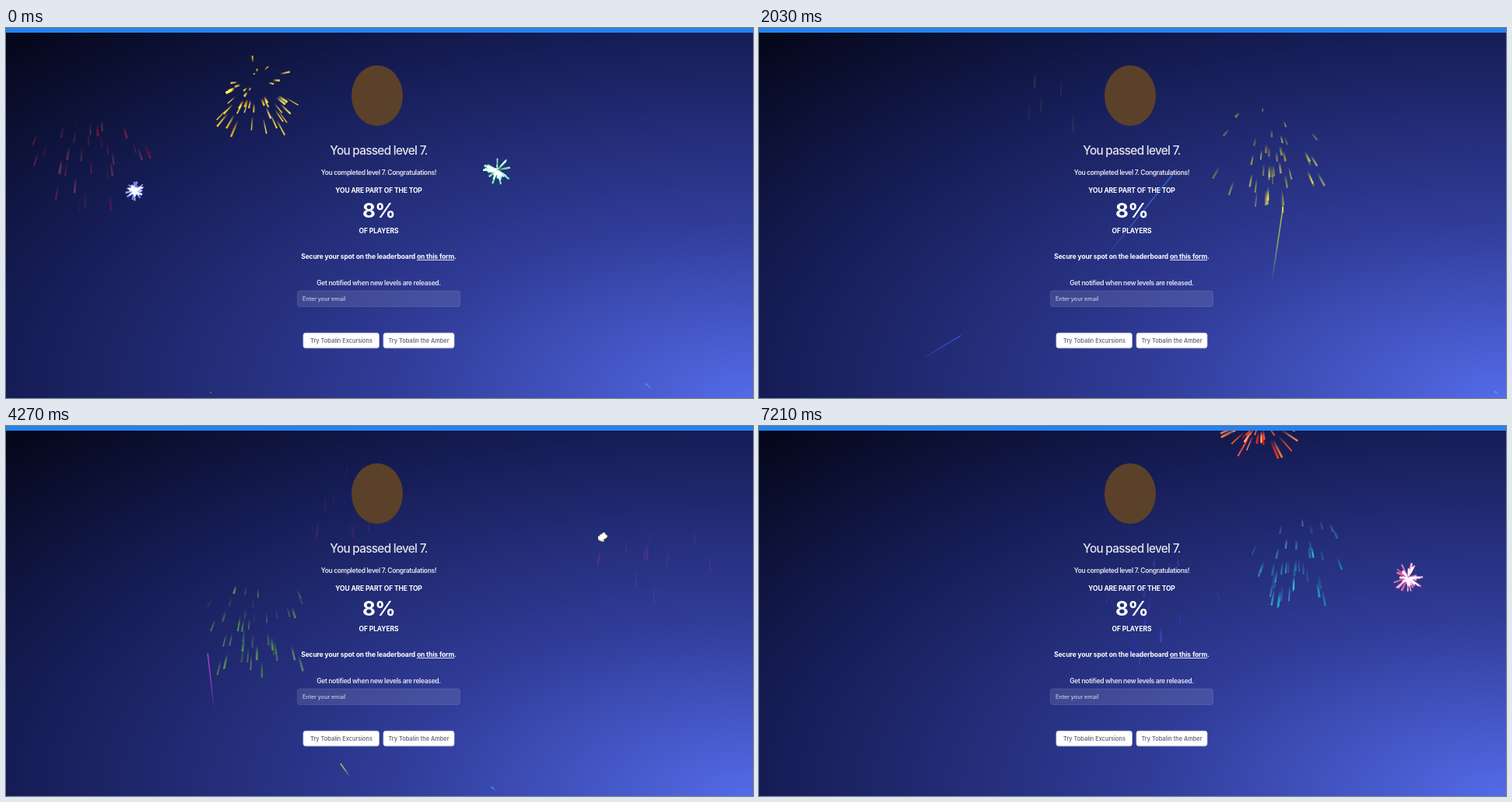
Animation of 960 by 476 pixels, one loop 7.28 s. Source, as an HTML page with a canvas:

```html
<!DOCTYPE html>
<html lang="en">
<head>
<meta charset="utf-8">
<title>Level passed</title>
<style>
  html, body { margin: 0; width: 100%; height: 100%; overflow: hidden; }
  body { background: radial-gradient(ellipse farthest-corner at 100% 100%,
    #546be8 0, #303c98 34%, #161d56 70%, #030616 100%); }
  canvas, svg { position: absolute; left: 0; top: 0; width: 960px; height: 476px; }
  text { font: 600 8.5px Inter, sans-serif; letter-spacing: -.04em; fill: #e4e4ec; text-anchor: middle; }
  .title { font-size: 15.3px; font-weight: 500; letter-spacing: -.045em; }
  .bold { font-weight: 700; letter-spacing: -.015em; fill: #fff; }
  .big { font-size: 26px; letter-spacing: -.03em; }
  .hint { font-size: 7.3px; font-weight: 500; letter-spacing: -.01em; text-anchor: start; fill: #c3c7e0; }
  .label { font-size: 7.4px; font-weight: 500; letter-spacing: 0; fill: #565b70; }
  .button { fill: #fff; stroke: #c0c3dc; stroke-width: .8; }
  .field { fill: #fff; fill-opacity: .11; stroke: #fff; stroke-opacity: .1; }
  .link { text-decoration: underline; }
</style>
</head>
<body>
<canvas width="960" height="476"></canvas>
<svg viewBox="0 0 960 476">
  <rect width="960" height="6" fill="#2583f0"/>
  <ellipse cx="477" cy="87" rx="33" ry="39" fill="#5b4129"/>
  <text class="title" x="479" y="163">You passed level 7.</text>
  <text x="479" y="189">You completed level 7. Congratulations!</text>
  <text class="bold" x="479" y="212">YOU ARE PART OF THE TOP</text>
  <text class="bold big" x="479" y="244">8%</text>
  <text class="bold" x="479" y="263.5">OF PLAYERS</text>
  <text class="bold" x="479" y="297">Secure your spot on the leaderboard <tspan class="link">on this form</tspan>.</text>
  <text x="479" y="330.5">Get notified when new levels are released.</text>
  <rect class="field" x="374.5" y="338" width="209" height="20.5" rx="3"/>
  <text class="hint" x="381" y="351">Enter your email</text>
  <rect class="button" x="382" y="392.3" width="97.5" height="19.5" rx="3"/>
  <text class="label" x="431" y="405">Try Tobalin Excursions</text>
  <rect class="button" x="485" y="392.3" width="91" height="19.5" rx="3"/>
  <text class="label" x="530.5" y="405">Try Tobalin the Amber</text>
</svg>
<script>
const LOOP = 7280, STEP = 70, FLOOR = 476;
const LAUNCH = 60, BOOST = 2.9, DRAG = 3.08, GRAVITY = 60, TRAIL = .2;
const ctx = document.querySelector('canvas').getContext('2d');

function seeded(seed) {
  return () => {
    seed = seed + 0x6d2b79f5 | 0;
    let n = Math.imul(seed ^ seed >>> 15, 1 | seed);
    n = n + Math.imul(n ^ n >>> 7, 61 | n) ^ n;
    return ((n ^ n >>> 14) >>> 0) / 4294967296;
  };
}

// Main bursts: time in seconds, x, y, hue
const shells = [
  [-.45, 320, 84, 48], [-.06, 165, 209, 235], [.65, 85, 125, 14], [1, 385, 38, 66],
  [2.13, 624, 75, 222], [2.48, 756, 96, 230], [3.3, 457, 70, 342], [3.34, 840, 103, 305],
  [4.45, 240, 126, 298], [4.82, 177, 78, 62], [5.18, 96, 60, 8], [5.47, 388, 130, 58],
  [5.62, 865, 198, 152], [6.49, 692, 145, 185], [6.86, 645, -6, 10]
];

// Others go up at an even pace anywhere in the sky
const scatter = seeded(7);
for (let at = -.8; at < 7.5; at += .72)
  shells.push([at, 100 + 760 * scatter(), 120 + 120 * scatter(), 360 * scatter()]);

// A line that fades out towards its first end
function streak(x1, y1, x2, y2, hue, light, alpha, width) {
  const fade = ctx.createLinearGradient(x1, y1, x2, y2);
  fade.addColorStop(0, `hsla(${hue},90%,${light}%,0)`);
  fade.addColorStop(.5, `hsla(${hue},90%,${light}%,${alpha * .75})`);
  fade.addColorStop(1, `hsla(${hue},90%,${light}%,${alpha})`);
  ctx.strokeStyle = fade;
  ctx.lineWidth = width;
  ctx.beginPath();
  ctx.moveTo(x1, y1);
  ctx.lineTo(x2, y2);
  ctx.stroke();
}

function rocket(left, x, y, hue, from) {
  const dx = x - from, dy = y - FLOOR, length = Math.hypot(dx, dy);
  const flight = Math.log(1 + length / LAUNCH) / BOOST - left;
  if (flight <= 0) return;
  const head = LAUNCH * (Math.exp(BOOST * flight) - 1) / length, tail = head * .6;
  streak(from + dx * tail, FLOOR + dy * tail, from + dx * head, FLOOR + dy * head, hue, 60, .75, 1.5);
}

function burst(age, x, y, hue, random) {
  const spread = 74 + 16 * random(), before = Math.max(0, age - TRAIL);
  const reach = t => spread * (1 - Math.exp(-DRAG * t));
  const fall = t => GRAVITY * t * t;
  const heat = 22 * Math.max(0, 1 - age / .35);
  for (let i = 0; i < 42; i++) {
    const angle = random() * 2 * Math.PI, speed = .15 + .85 * random();
    const tint = hue + random() * 16 - 8, light = 50 + random() * 20 + heat;
    const fade = 1.5 + random() * 1.6, width = 1.4 + random() * 1.6;
    const alpha = Math.min(1, 1 - fade * (age - .45));
    if (alpha <= 0) continue;
    const dx = Math.cos(angle) * speed, dy = Math.sin(angle) * speed;
    streak(x + dx * reach(before), y + dy * reach(before) + fall(before),
      x + dx * reach(age), y + dy * reach(age) + fall(age), tint, light, alpha, width);
  }
}

function draw() {
  const now = Math.floor(performance.now() % LOOP / STEP) * STEP / 1000;
  ctx.clearRect(0, 0, 960, 476);
  ctx.globalCompositeOperation = 'lighter';
  shells.forEach(([at, x, y, hue], i) => {
    const random = seeded(i * 97 + 11), age = now - at, from = 960 * random();
    if (age < 0) rocket(-age, x, y, hue, from);
    else burst(age, x, y, hue, random);
  });
  requestAnimationFrame(draw);
}
draw();
</script>
</body>
</html>
```
